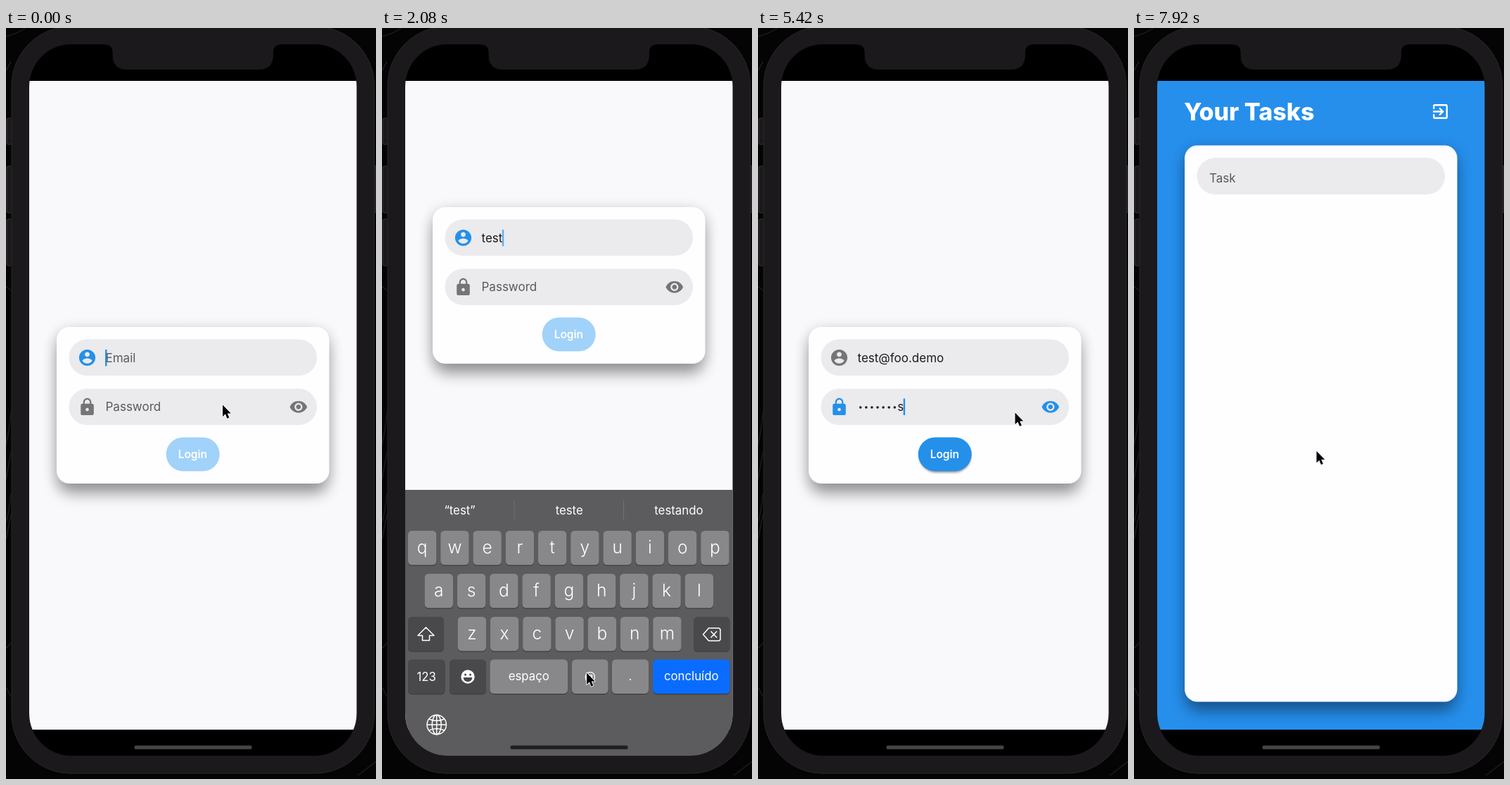
An HTML page that plays this animation: 526 px wide and 1065 px high, repeating every 8 s.

```html
<!DOCTYPE html>
<html lang="en">
<head>
<meta charset="utf-8">
<title>Login demo</title>
<style>
html, body { margin: 0; width: 100%; height: 100%; overflow: hidden; background: #000; }
svg { display: block; width: 100%; height: 100%; }
text { font-family: Inter, "Open Sans", sans-serif; white-space: pre; }
.field { fill: #ebeaec; }
.hint { fill: #5b595e; font-size: 17px; }
.typed { fill: #1d1b1f; font-size: 17px; }
.mid { text-anchor: middle; }
.letter { fill: #fff; font-size: 24.5px; font-weight: 300; text-anchor: middle; }
.word { fill: #fff; font-size: 16.8px; text-anchor: middle; }
.line { fill: none; stroke: #fff; stroke-width: 1.5; stroke-linejoin: round; }
</style>
</head>
<body>
<svg viewBox="0 0 526 1065" xmlns="http://www.w3.org/2000/svg">
  <defs>
    <clipPath id="screen"><rect x="33" y="23" width="465.5" height="1009" rx="60"/></clipPath>
    <filter id="soft" x="-30%" y="-30%" width="160%" height="160%"><feGaussianBlur stdDeviation="10.5"/></filter>
    <filter id="tight" x="-30%" y="-30%" width="160%" height="160%"><feGaussianBlur stdDeviation="1.6"/></filter>
  </defs>

  <rect width="526" height="1065" fill="#040404"/>
  <g fill="none" stroke="#1c1c1d" stroke-width="1.5">
    <path d="M0 12Q16 8 28 0M0 60L7 48M0 366L7 372M0 590Q5 570 7 545M0 640L7 602M0 700Q4 690 7 660M0 725L7 690M0 880L7 872M0 935L7 948M500 1060L526 1040"/>
  </g>
  <g fill="#1b191b" stroke="#353436">
    <rect x="1" y="128" width="10" height="37" rx="2"/>
    <rect x="1" y="196" width="10" height="66" rx="2"/>
    <rect x="1" y="271" width="10" height="66" rx="2"/>
    <rect x="518" y="195" width="8" height="67" rx="2"/>
  </g>
  <rect x="8" y="-2" width="515.5" height="1059" rx="84" fill="#1b191b" stroke="#29272a"/>
  <rect x="33" y="23" width="465.5" height="1009" rx="60"/>

  <g clip-path="url(#screen)">
    <g id="login">
      <rect x="33" y="75" width="466" height="920" fill="#f9f8fb"/>
      <g id="card">
        <rect x="74" y="438" width="383" height="222" rx="18" opacity=".36" filter="url(#soft)"/>
        <rect x="72" y="427" width="387" height="222" rx="18" opacity=".13" filter="url(#soft)"/>
        <rect x="72" y="424" width="387.5" height="222" rx="18" fill="#fefdff"/>
        <rect class="field" x="89.5" y="441.5" width="352.5" height="51.5" rx="25.7"/>
        <rect class="field" x="89.5" y="511.5" width="352.5" height="51.5" rx="25.7"/>
        <path id="person" transform="translate(115.5 467.5) scale(1.16) translate(-12 -12)" d="M12 2C6.48 2 2 6.48 2 12s4.48 10 10 10 10-4.48 10-10S17.52 2 12 2zm0 3c1.66 0 3 1.34 3 3s-1.34 3-3 3-3-1.34-3-3 1.34-3 3-3zm0 14.2c-2.5 0-4.71-1.28-6-3.22.03-1.99 4-3.08 6-3.08 1.99 0 5.97 1.09 6 3.08-1.29 1.94-3.5 3.22-6 3.22z"/>
        <path id="lock" transform="translate(115.5 537.5) scale(1.16) translate(-12 -12)" d="M18 8h-1V6c0-2.76-2.24-5-5-5S7 3.24 7 6v2H6c-1.1 0-2 .9-2 2v10c0 1.1.9 2 2 2h12c1.1 0 2-.9 2-2V10c0-1.1-.9-2-2-2zm-6 9c-1.1 0-2-.9-2-2s.9-2 2-2 2 .9 2 2-.9 2-2 2zm3.1-9H8.9V6c0-1.71 1.39-3.1 3.1-3.1 1.71 0 3.1 1.39 3.1 3.1v2z"/>
        <path id="eye" transform="translate(415.8 537.3) scale(1.12) translate(-12 -12)" d="M12 4.5C7 4.5 2.73 7.61 1 12c1.73 4.39 6 7.5 11 7.5s9.27-3.11 11-7.5c-1.73-4.39-6-7.5-11-7.5zM12 17c-2.76 0-5-2.24-5-5s2.24-5 5-5 5 2.24 5 5-2.24 5-5 5zm0-8c-1.66 0-3 1.34-3 3s1.34 3 3 3 3-1.34 3-3-1.34-3-3-3z"/>
        <text id="emailHint" class="hint" x="141.5" y="473.5">Email</text>
        <text id="email" class="typed" x="141.5" y="473.5"></text>
        <text id="passHint" class="hint" x="141.5" y="543.3">Password</text>
        <g id="dots" fill="#1d1b1f"></g>
        <text id="lastChar" class="typed" y="543.3"></text>
        <rect id="caret" width="2.4" height="23.5" fill="#2490ea"/>
        <rect id="buttonShadow" x="229" y="583" width="74" height="47.5" rx="23.7" opacity=".4" filter="url(#tight)"/>
        <rect id="button" y="580.5" height="48" rx="24"/>
        <text id="loginLabel" class="mid" x="265.3" y="609.7" font-size="15.4" font-weight="600" fill="#fff">Login</text>
        <path id="spinner" fill="none" stroke="#fff" stroke-width="4.6" stroke-linecap="square"/>
      </g>
    </g>

    <g id="tasks">
      <rect x="33" y="75" width="466" height="920" fill="#268fec"/>
      <svg x="33" y="75" width="466" height="920" viewBox="33 75 466 920">
        <rect x="74" y="180" width="383" height="789" rx="18" opacity=".36" filter="url(#soft)"/>
        <rect x="72" y="169" width="387" height="789" rx="18" opacity=".13" filter="url(#soft)"/>
      </svg>
      <rect x="72" y="166.5" width="387.5" height="789" rx="18" fill="#fefdff"/>
      <text x="71" y="131" font-size="34" font-weight="800" fill="#fff">Your Tasks</text>
      <path fill="#fff" transform="translate(435.5 118.5) scale(1.16) translate(-12 -12)" d="M10.09 15.59L11.5 17l5-5-5-5-1.41 1.41L12.67 11H3v2h9.67l-2.58 2.59zM19 3H5c-1.11 0-2 .9-2 2v4h2V5h14v14H5v-4H3v4c0 1.1.89 2 2 2h14c1.1 0 2-.9 2-2V5c0-1.1-.9-2-2-2z"/>
      <rect class="field" x="89.5" y="184" width="352.5" height="52" rx="26"/>
      <text class="hint" x="107" y="219">Task</text>
    </g>

    <g id="keyboard">
      <rect x="33" y="655" width="466" height="380" fill="#5c5b5d"/>
      <path d="M188 670V697M343.5 670V697" stroke="#727173"/>
      <g id="keys"></g>
      <path class="line" d="M62.5 850L74 861.5H67.5V868.5H57.5V861.5H51Z"/>
      <path class="line" d="M456.5 860L464.5 851H478Q481 851 481 854V866Q481 869 478 869H464.5ZM467.5 855.5L476 864.5M476 855.5L467.5 864.5"/>
      <circle cx="122" cy="920" r="9.7" fill="#fff"/>
      <g fill="#49484a"><circle cx="118.5" cy="917" r="1.5"/><circle cx="125.5" cy="917" r="1.5"/><path d="M115.5 921H128.5Q127.500 927 122 927T115.500 921Z"/></g>
      <g class="line"><circle cx="77.700" cy="988" r="13.700"/><ellipse cx="77.700" cy="988" rx="6.500" ry="13.700"/><path d="M64 988H91.400M77.700 974.300V1001.700M67 980Q77.700 985 88.400 980M67 996Q77.700 991 88.400 996"/></g>
    </g>
    <rect id="homeBar" x="182.500" y="1017.500" width="167" height="5.300" rx="2.600"/>
  </g>

  <path fill="#1b191b" d="M140 22.500H391V23.500Q380 24 380 34V38Q380 59 359 59H172Q151.500 59 151.500 38V34Q151.500 24 140 23.500Z"/>
  <path id="pointer" d="M0 0V16.500L3.800 13L6.500 19.200L9.300 18L6.700 12H11.700Z" stroke="#fff" stroke-width="1.700" paint-order="stroke" stroke-linejoin="round"/>
</svg>

<script>
const LOOP = 8000, FRAME = 1000 / 12;
const BLUE = '#2490ea', PALE = '#a1d2f9', GREY = '#757477', DISABLED = '#89888b';
const EMAIL = 'test@foo.demo', PASSWORD = 'progress';

const KEYBOARD_UP = 1540, KEYBOARD_DOWN = 2700;
const EMAIL_BLUR = 4080, PASS_FOCUS = 4160, SUBMIT = 6410, SIGNED_IN = 7660;

const evenly = (start, step, count) => Array.from({ length: count }, (_, i) => start + i * step);
const EMAIL_TIMES = [80, 200, 330, 500, 2340, ...evenly(3330, 95, 8)];
const PASS_TIMES = evenly(4420, 130, 8);

const POINTER = [
  [0, 308, 534.5], [790, 308, 534.5], [1500, 310, 557.5], [1590, 310, 557.5],
  [2000, 291, 914.5], [4085, 291, 914.5], [4700, 365.5, 545.5],
  [5500, 365.5, 545.5], [6000, 259.5, 600], [LOOP, 259.5, 600]
];

const $ = id => document.getElementById(id);
const set = (id, attrs) => { for (const k in attrs) $(id).setAttribute(k, attrs[k]); };
const show = (id, on) => set(id, { display: on ? 'inline' : 'none' });
const clamp = v => Math.min(1, Math.max(0, v));
const smooth = v => v * v * (3 - 2 * v);
const easeOut = v => 1 - (1 - v) ** 3;
const typedCount = (times, t) => times.filter(at => at <= t).length;

function key(x, y, w, label, cls, fill = '#88878a', drop = 32) {
  return `<rect x="${x}" y="${y + 1.3}" width="${w}" height="48.500" rx="5.500" fill="#3d3c3e"/>
    <rect x="${x}" y="${y}" width="${w}" height="48.500" rx="5.500" fill="${fill}"/>
    <text class="${cls}" x="${x + w / 2}" y="${y + drop}">${label}</text>`;
}

function buildKeyboard() {
  const dark = '#49484a';
  const row = (letters, x, y) =>
    [...letters].map((c, i) => key(x + 46.25 * i, y, 40.3, c, 'letter')).join('');
  const words = ['“test”', 'teste', 'testando']
    .map((w, i) => `<text class="word" x="${110.5 + 155.7 * i}" y="689.500">${w}</text>`).join('');
  $('keys').innerHTML = words +
    row('qwertyuiop', 37, 713) + row('asdfghjkl', 60.7, 774) + row('zxcvbnm', 107.7, 835) +
    key(37, 835, 51, '', 'word', dark) + key(443, 835, 51.5, '', 'word', dark) +
    key(37, 895.5, 52.5, '123', 'word', dark, 30) + key(96, 895.5, 52, '', 'word', dark) +
    key(153.5, 895.5, 110.5, 'espaço', 'word', undefined, 29) +
    key(270, 895.5, 51.5, '@', 'word', undefined, 29) +
    key(327, 895.5, 52, '.', 'word', undefined, 29) +
    key(385, 895.5, 109.5, 'concluído', 'word', '#0a6cff', 29);
}

function pointerAt(t) {
  const i = POINTER.findIndex((p, n) => n && t <= p[0]);
  const [t0, x0, y0] = POINTER[i - 1], [t1, x1, y1] = POINTER[i];
  const k = smooth((t - t0) / (t1 - t0));
  return [x0 + (x1 - x0) * k, y0 + (y1 - y0) * k];
}

// Solid for half a second after the last key, then fades out and in.
function caretOpacity(elapsed) {
  if (elapsed < 500) return 1;
  const phase = elapsed % 1000, k = clamp((phase % 500) / 250);
  return phase < 500 ? k : 1 - k;
}

function spinnerPath(t) {
  const saw = t / 1333 % 1, curve = v => smooth(Math.sqrt(clamp(v)));
  const head = curve(saw * 2), tail = curve(saw * 2 - 1);
  const start = -112 + tail * 270 + t / 2222 * 360 + saw * 90;
  const sweep = Math.max(1, (head - tail) * 270);
  const point = deg => {
    const a = deg * Math.PI / 180;
    return `${266 + 19.6 * Math.cos(a)} ${604.7 + 19.6 * Math.sin(a)}`;
  };
  return `M${point(start)}A19.6 19.6 0 ${sweep > 180 ? 1 : 0} 1 ${point(start + sweep)}`;
}

function drawForm(t) {
  const loading = t >= SUBMIT, onPassword = t >= PASS_FOCUS;
  const typed = typedCount(EMAIL_TIMES, t), chars = typedCount(PASS_TIMES, t);
  const icon = focused => loading ? DISABLED : focused ? BLUE : GREY;
  set('person', { fill: icon(t < EMAIL_BLUR) });
  set('lock', { fill: icon(onPassword) });
  set('eye', { fill: icon(t >= 4300) });

  $('email').textContent = EMAIL.slice(0, typed);
  show('emailHint', !typed);
  show('passHint', !chars);

  const dots = loading ? chars : Math.max(0, chars - 1);
  [...$('dots').children].forEach((dot, i) => dot.setAttribute('display', i < dots ? 'inline' : 'none'));
  $('lastChar').textContent = dots < chars ? PASSWORD[chars - 1] : '';
  set('lastChar', { x: 141.5 + 8.1 * dots });

  const width = onPassword
    ? 8.1 * dots + $('lastChar').getComputedTextLength()
    : typed ? $('email').getComputedTextLength() : 0;
  const lastKey = onPassword
    ? (chars ? PASS_TIMES[chars - 1] : PASS_FOCUS)
    : (typed ? EMAIL_TIMES[typed - 1] : 0);
  set('caret', {
    x: 141 + width, y: onPassword ? 525.5 : 456,
    opacity: loading || (t >= EMAIL_BLUR && !onPassword) ? 0 : caretOpacity(t - lastKey)
  });

  const enabled = chars >= 7 && !loading;
  set('button', { x: loading ? 228.7 : 227.7, width: loading ? 74 : 76, fill: enabled ? BLUE : PALE });
  show('buttonShadow', enabled);
  show('loginLabel', !loading);
  show('spinner', loading);
  if (loading) set('spinner', { d: spinnerPath(t - SUBMIT) });
}

function render(time) {
  const t = Math.floor((time + 5) / FRAME) * FRAME % LOOP;
  const signedIn = t >= SIGNED_IN;
  show('login', !signedIn);
  show('tasks', signedIn);
  if (!signedIn) drawForm(t);

  const raised = t >= KEYBOARD_UP && t < KEYBOARD_DOWN;
  const up = easeOut(clamp((t - KEYBOARD_UP) / 400)) - easeOut(clamp((t - KEYBOARD_DOWN) / 400));
  set('card', { transform: `translate(0 ${raised ? -170 : 0})` });
  set('keyboard', { transform: `translate(0 ${(1 - up) * 377})` });
  show('keyboard', up > 0.001);
  set('homeBar', { fill: up > 0.1 ? '#1f1e20' : '#454446' });
  set('pointer', { transform: `translate(${pointerAt(t).join(' ')})` });
}

buildKeyboard();
$('dots').innerHTML = evenly(145.7, 8.1, 8).map(x => `<circle cx="${x}" cy="538" r="1.800"/>`).join('');

const began = performance.now();
function tick() {
  render((performance.now() - began) % LOOP);
  requestAnimationFrame(tick);
}
tick();
</script>
</body>
</html>
```
